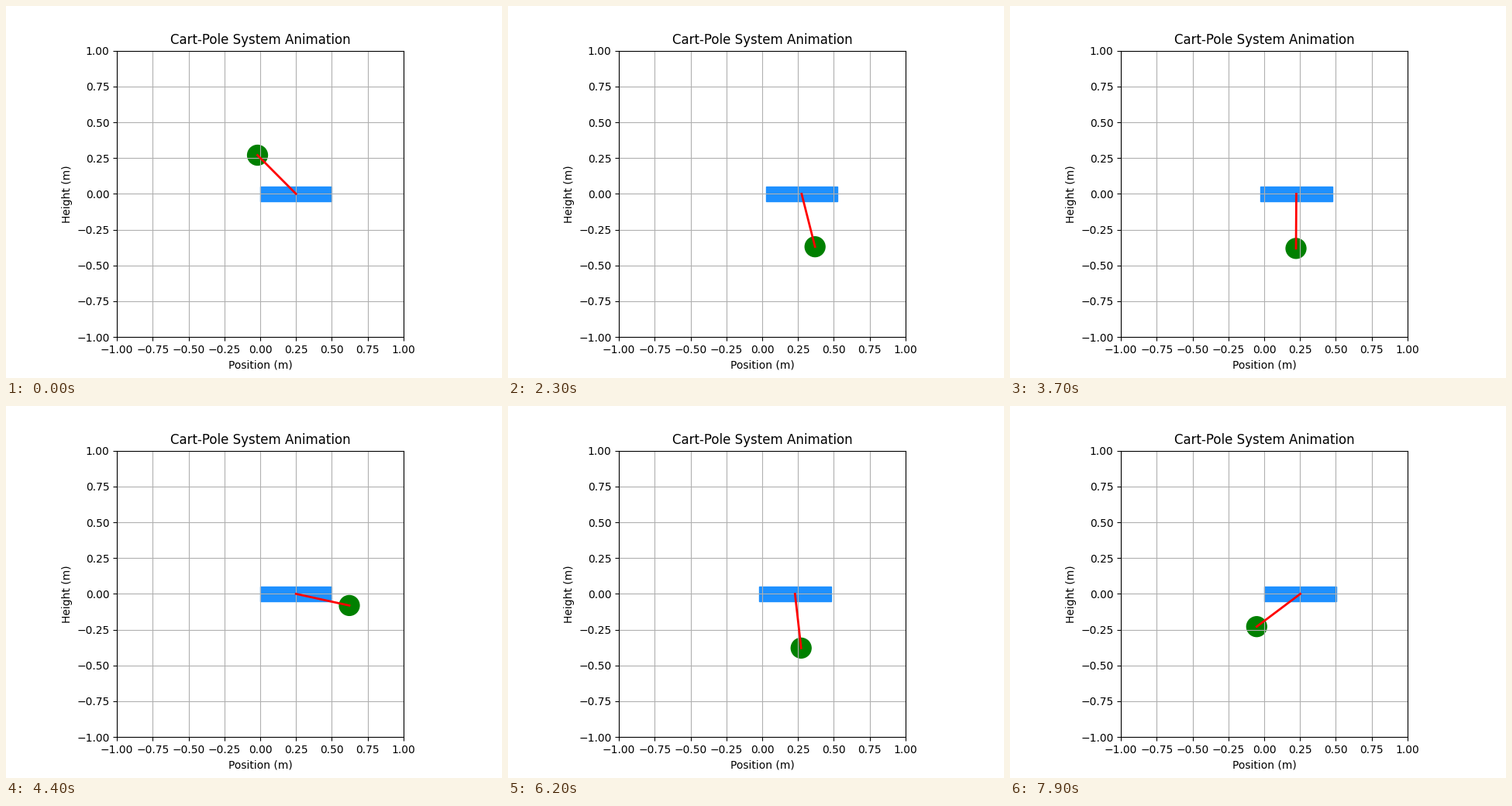
Write a matplotlib script that moves like this. It is 640 by 480 pixels and loops after 8 s.

```python
import numpy as np
import matplotlib.pyplot as plt
from matplotlib.animation import FuncAnimation
from matplotlib.patches import Circle, Rectangle

FRAMES, INTERVAL, SUBSTEPS = 80, 100, 50
POLE, BALL_R = 0.381, 0.07
CART_W, CART_H, CART_X = 0.5, 0.1, 0.25
RECOIL, LAG = 0.0072, 0.07    # cart response to the swing


def swing_time(n):
    """Time of half-swing n; half-swings get shorter as the pole calms down."""
    m = n - 0.5
    return 0.8645 + 1.13 * m + 0.363 * (1 - 0.59**m) / (1 - 0.59)


def swing_angle(n):
    """Exact pendulum waveform (Fourier series) with decaying amplitude."""
    amplitude = np.radians(30 + 104.8 * 0.777**n)
    root = np.sqrt(np.cos(amplitude / 2))
    e = (1 - root) / (1 + root) / 2
    nome = e + 2 * e**5
    return -8 * sum(
        nome**(k / 2) / (k * (1 + nome**k)) * np.sin(k * np.pi * (n + 0.5))
        for k in (1, 3, 5, 7))


def cart_path(angle, dt):
    """The cart recoils against the pole's sideways speed, with a short lag."""
    push = -RECOIL * np.gradient(np.sin(angle), dt)
    shift = np.zeros_like(push)
    for i in range(1, len(push)):
        shift[i] = shift[i - 1] + (push[i] - shift[i - 1]) * dt / LAG
    return CART_X + shift


dt = INTERVAL / 1000 / SUBSTEPS
time = np.arange(FRAMES * SUBSTEPS) * dt
swings = np.linspace(-0.1, 7, 5000)
theta = swing_angle(np.interp(time, swing_time(swings), swings))
cart_x = cart_path(theta, dt)[::SUBSTEPS]
theta = theta[::SUBSTEPS]
ball_x = cart_x + POLE * np.sin(theta)
ball_y = -POLE * np.cos(theta)

fig, ax = plt.subplots(figsize=(6.4, 4.8), dpi=100)
ax.set_xlim(-1, 1)
ax.set_ylim(-1, 1)
ax.set_aspect("equal")
ax.grid(True)
ax.set_title("Cart-Pole System Animation")
ax.set_xlabel("Position (m)")
ax.set_ylabel("Height (m)")

cart = ax.add_patch(Rectangle((0, -CART_H / 2), CART_W, CART_H, color="dodgerblue"))
ball = ax.add_patch(Circle((0, 0), BALL_R, color="green"))
pole, = ax.plot([], [], color="red", lw=2)


def update(i):
    cart.set_x(cart_x[i] - CART_W / 2)
    ball.center = ball_x[i], ball_y[i]
    pole.set_data([cart_x[i], ball_x[i]], [0, ball_y[i]])
    return cart, ball, pole


anim = FuncAnimation(fig, update, frames=FRAMES, interval=INTERVAL,
                     repeat=True, repeat_delay=0)
plt.show()
```
